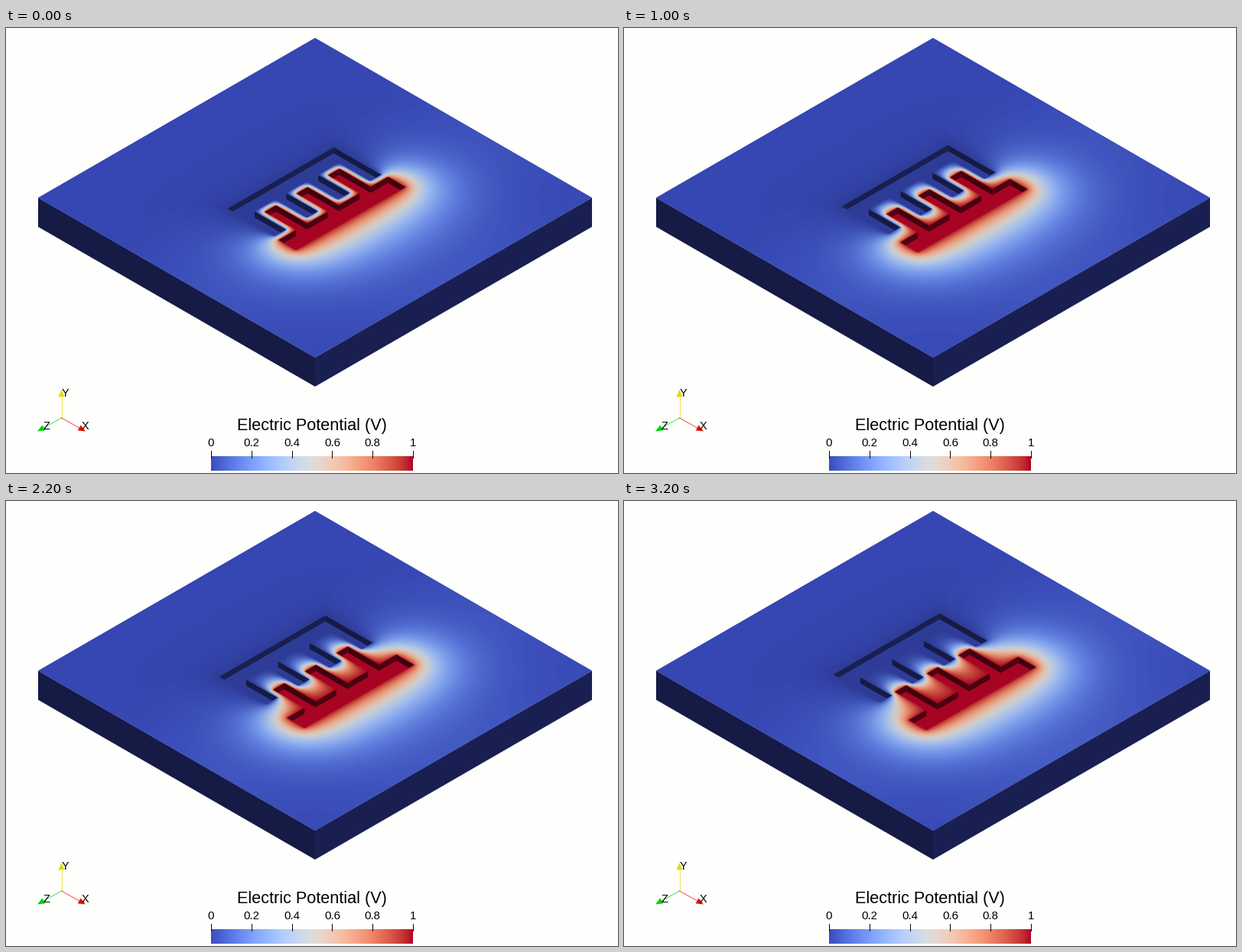
These frames come from a looping animation (800 px wide and 582 px high, 3.4 s). A matplotlib script:

```python
import numpy as np
import matplotlib.pyplot as plt
from matplotlib.animation import FuncAnimation
from matplotlib.collections import PolyCollection
from matplotlib.patches import Polygon
from matplotlib.path import Path
from matplotlib.transforms import Affine2D

W, H, DPI = 800, 582, 100
FRAMES, INTERVAL = 17, 200
SIDE, SLOPE, APEX = 362, 209 / 362, (404, 13)
THICKNESS, RECESS = 38, 8

# Comb layout along the second plate axis
PITCH, TOOTH, MID = 41.5, 14.5, SIDE / 2

DECAY = 36                                 # decay length of the potential
TOP_LIGHT, A_LIGHT, B_LIGHT = .93, .42, .36  # brightness by facing direction
CMAP = plt.get_cmap("coolwarm")


def shade(value, light):
    color = np.array(CMAP(value))
    color[..., :3] *= np.asarray(light)[..., None]
    return color


def project(points, drop=0):
    a, b = np.asarray(points, float).T
    return np.column_stack((APEX[0] + a - b, APEX[1] + SLOPE * (a + b) + drop))


def ground_comb(step):
    back, base, tip = 136 - step, 157 - step, 198 - step
    starts = MID - TOOTH / 2 + PITCH * np.array([-1.5, -.5, .5, 1.5])
    points = [(back, starts[0]), (back, starts[-1] + TOOTH)]
    for i, s in enumerate(starts[::-1]):
        if i:
            points.append((base, s + TOOTH))
        points += [(tip, s + TOOTH), (tip, s)]
        if i < 3:
            points.append((base, s))
    return points


def live_comb(step):
    tip, base, back = 164 + step, 205 + step, 228 + step
    low, high = MID - 71.5, MID + 71.5
    points = [(base, low)]
    for s in MID - TOOTH / 2 + PITCH * np.array([-1, 0, 1]):
        points += [(base, s), (tip, s), (tip, s + TOOTH), (base, s + TOOTH)]
    return points + [(base, high), (back, high), (back, low)]


centers = np.arange(SIDE) + .5
GRID_A, GRID_B = np.meshgrid(centers, centers)
GRID = np.column_stack((GRID_A.ravel(), GRID_B.ravel()))


def inside(points):
    return Path(points).contains_points(GRID).reshape(SIDE, SIDE)


def operator(field):
    """Screened negative Laplacian with insulated edges."""
    p = np.pad(field, 1, mode="edge")
    around = p[:-2, 1:-1] + p[2:, 1:-1] + p[1:-1, :-2] + p[1:-1, 2:]
    return (4 + DECAY ** -2) * field - around


def solve(step, guess, iterations=110):
    """Potential with the combs held at 0 and 1, by conjugate gradients."""
    ground, live = inside(ground_comb(step)), inside(live_comb(step))
    free = ~(ground | live)
    field = np.where(live, 1, guess * free)
    residual = -operator(field) * free
    direction = residual.copy()
    norm = (residual ** 2).sum()
    for _ in range(iterations):
        image = operator(direction) * free
        alpha = norm / (direction * image).sum()
        field += alpha * direction
        residual -= alpha * image
        new_norm = (residual ** 2).sum()
        direction = residual + new_norm / norm * direction
        norm = new_norm
    return np.clip(field, 0, 1)


def surface_colors(step, field):
    """Colours of the top, dimmed softly around the grounded comb."""
    away_a = np.maximum(np.abs(GRID_A - (167 - step)) - 31, 0)
    away_b = np.maximum(np.abs(GRID_B - MID) - 69.5, 0)
    shadow = .15 * np.exp(-np.hypot(away_a, away_b) / 22) * (1 - field) ** 4
    return shade(field, TOP_LIGHT * (1 - shadow))


def visible_walls(points):
    """Walls facing the viewer, and the light on each."""
    quads, lights = [], []
    for p, q in zip(points, points[1:] + points[:1]):
        if q[1] > p[1] or q[0] < p[0]:
            quads.append(np.vstack((project([p, q]), project([q, p], RECESS))))
            lights.append(A_LIGHT if q[1] > p[1] else B_LIGHT)
    return quads, lights


class Recess:
    def __init__(self, ax, outline, value, floor_light):
        self.outline = outline
        points = outline(0)
        self.floor = ax.add_patch(Polygon(project(points), fc=shade(value, floor_light),
                                          ec="none", zorder=3))
        quads, lights = visible_walls(points)
        self.walls = PolyCollection(quads, facecolors=[shade(value, l) for l in lights],
                                    edgecolors="none", zorder=4)
        ax.add_collection(self.walls, autolim=False)

    def move(self, step):
        points = self.outline(step)
        self.floor.set_xy(project(points))
        self.walls.set_verts(visible_walls(points)[0])
        self.walls.set_clip_path(self.floor)


fig = plt.figure(figsize=(W / DPI, H / DPI), dpi=DPI, facecolor="#fefefd")
ax = fig.add_axes([0, 0, 1, 1])
ax.axis("off")


def polygon(points, color, zorder=1):
    return ax.add_patch(Polygon(points, fc=color, ec="none", zorder=zorder))


def label(x, y, text, size):
    ax.text(x, y, text, fontsize=size * 72 / DPI, family="Liberation Sans",
            ha="center", va="baseline", color="black", zorder=6)


# Slab
left, front, right = (0, SIDE), (SIDE, SIDE), (SIDE, 0)
for p, q, light in ((left, front, B_LIGHT), (front, right, A_LIGHT)):
    polygon(np.vstack((project([p, q]), project([q, p], THICKNESS))), shade(0., light))
top = polygon(project([(0, 0), right, front, left]), shade(0., TOP_LIGHT))

frames, field = [], np.zeros((SIDE, SIDE))
for k in range(FRAMES):
    field = solve(k, field, 300 if k == 0 else 90)
    frames.append(surface_colors(k, field))

plate_map = Affine2D.from_values(1, SLOPE, -1, SLOPE, *APEX)
surface = ax.imshow(frames[0], extent=(0, SIDE, 0, SIDE), origin="lower",
                    interpolation="bilinear", aspect="auto", zorder=2,
                    transform=plate_map + ax.transData)
surface.set_clip_path(top)

recesses = [Recess(ax, ground_comb, 0., TOP_LIGHT * .85),
            Recess(ax, live_comb, 1., TOP_LIGHT)]

# Colour legend
ax.imshow(CMAP(np.linspace(0, 1, 256)[None, :]), extent=(268, 532, 579, 560),
          aspect="auto", interpolation="bilinear", zorder=2)
label(400, 526, "Electric Potential (V)", 21.7)
for i, text in enumerate(("0", "0.2", "0.4", "0.6", "0.8", "1")):
    x = 268 + 52.8 * i
    ax.plot([x, x], [553, 562], color="black", lw=.7, zorder=5)
    label(x, 547, text, 15)

# Orientation axes
ORIGIN = np.array([72.5, 510])
for tip, color, name, spot in (((72.5, 473), "#e0dc00", "Y", (78, 482)),
                               ((104, 527.5), "#e01000", "X", (103, 525)),
                               ((41, 527.5), "#00d010", "Z", (53, 525))):
    tip = np.array(tip)
    along = (tip - ORIGIN) / np.hypot(*(tip - ORIGIN))
    across = np.array([-along[1], along[0]])
    base = tip - 9.5 * along
    ax.plot(*zip(ORIGIN, base), color=color, lw=.7, alpha=.7, zorder=5)
    polygon([tip, base + 4 * across, base - 4 * across], color, 5)
    label(*spot, name, 14.5)

ax.set_xlim(0, W)
ax.set_ylim(H, 0)


def update(step):
    surface.set_data(frames[step])
    for recess in recesses:
        recess.move(step)
    return []


anim = FuncAnimation(fig, update, frames=FRAMES, interval=INTERVAL,
                     repeat=True, repeat_delay=0, blit=False)
plt.show()
```
